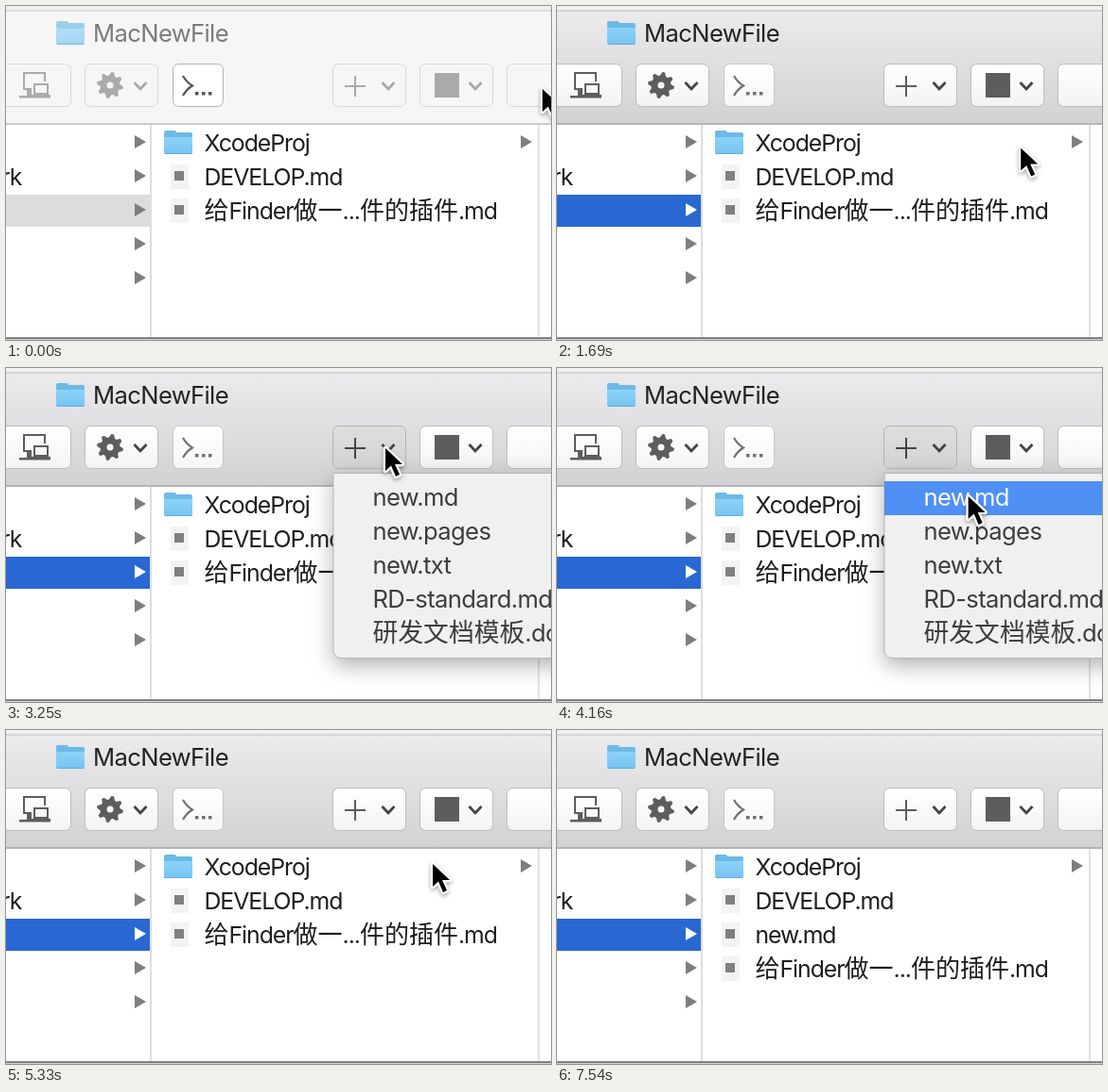
An HTML page with a canvas for the animation above (7.67 s loop, 576 by 354 pixels).

```html
<!DOCTYPE html>
<html lang="zh-CN">
<head>
<meta charset="utf-8">
<style>
html, body { margin: 0; width: 100%; height: 100%; overflow: hidden; background: #fff; }
canvas { display: block; }
</style>
</head>
<body>
<canvas id="stage" width="576" height="354"></canvas>
<script>
const c = document.getElementById('stage').getContext('2d');
const LOOP = 7670, STEP = 130, ROW = 36;

// Cursor path: time, x, y of the tip
const path = [
  [0, 565, 84], [130, 462, 178], [1300, 462, 178], [1430, 541, 188],
  [2080, 409, 84], [2340, 409, 84], [2470, 405, 82], [2600, 399, 81],
  [3250, 399, 81], [3640, 404, 104], [4420, 447, 146], [4550, 449, 138],
  [5720, 449, 138], [5850, 451, 136], [6760, 451, 136], [6890, 468, 139],
  [7280, 468, 139], [7410, 482, 150], [LOOP, 482, 150]
];
const menuItems = ['new.md', 'new.pages', 'new.txt', 'RD-standard.md', '研发文档模板.docx'];

// Font styles: Latin size, tracking, Chinese size
const LIST = [24.8, -1.03, 26], MENU = [25.6, -.63, 26.8];

function cursorAt(t) {
  const i = path.findIndex(p => p[0] > t);
  const [t0, x0, y0] = path[i - 1], [t1, x1, y1] = path[i];
  const k = (t - t0) / (t1 - t0);
  return [x0 + (x1 - x0) * k, y0 + (y1 - y0) * k];
}

function rect(x, y, w, h, color) {
  c.fillStyle = color;
  c.fillRect(x, y, w, h);
}

function poly(points, color) {
  c.beginPath();
  points.forEach(([x, y]) => c.lineTo(x, y));
  c.closePath();
  c.fillStyle = color;
  c.fill();
}

function line(points, color, width) {
  c.beginPath();
  points.forEach(([x, y]) => c.lineTo(x, y));
  c.strokeStyle = color;
  c.lineWidth = width;
  c.stroke();
}

function fade(y0, y1, from, to) {
  const g = c.createLinearGradient(0, y0, 0, y1);
  g.addColorStop(0, from);
  g.addColorStop(1, to);
  return g;
}

// Latin and Chinese runs alternate, each with its own font
function text(s, x, y, [size, tracking, hanSize], color) {
  c.fillStyle = color;
  s.split(/([^\x00-\x7f]+)/).forEach((run, i) => {
    const han = i % 2;
    c.font = han ? `${hanSize}px "Noto Sans CJK SC", "Noto Sans CJK", sans-serif`
                 : `${size}px Inter, sans-serif`;
    c.letterSpacing = (han ? 0 : tracking) + 'px';
    c.fillText(run, x, y);
    x += c.measureText(run).width;
  });
}

function folder(x, y) {
  c.beginPath();
  c.roundRect(x, y, 13, 6, 2);
  c.roundRect(x, y + 2, 30, 6, 2);
  c.fillStyle = '#6cbae6';
  c.fill();
  c.beginPath();
  c.roundRect(x, y + 7, 30, 18, 1.5);
  c.fillStyle = fade(y + 7, y + 25, '#8cd2f8', '#76c4f2');
  c.fill();
  rect(x + 1, y + 24, 28, 1, '#5fadd9');
}

function page(y) {
  rect(174, y, 19, 26, '#f3f3f3');
  rect(178, y + 7, 10, 10, '#808080');
}

function button(x, w, top, bottom, border) {
  c.beginPath();
  c.roundRect(x + .5, 61.5, w, 45, 6);
  c.fillStyle = fade(61, 107, top, bottom);
  c.fill();
  c.strokeStyle = border;
  c.lineWidth = 1;
  c.stroke();
}

function chevron(x, color) {
  line([[x - 6.5, 81], [x, 88], [x + 6.5, 81]], color, 2.8);
}

function gear(x, y, color) {
  c.beginPath();
  for (let i = 0; i < 32; i++) {
    const a = (i + .5) * Math.PI / 16, r = i % 4 < 2 ? 14 : 10.5;
    c.lineTo(x + r * Math.cos(a), y + r * Math.sin(a));
  }
  c.closePath();
  c.moveTo(x + 3.5, y);
  c.arc(x, y, 3.5, 0, 2 * Math.PI, true);
  c.fillStyle = color;
  c.fill('evenodd');
}

function devices(color, face) {
  c.strokeStyle = color;
  c.lineWidth = 2;
  c.strokeRect(19, 71, 22, 17);
  rect(22, 89, 5, 6, color);
  rect(14, 95, 14, 2.5, color);
  rect(27, 80, 20, 18, face);
  c.strokeRect(30, 83, 14, 10);
  rect(27, 94, 20, 3.5, color);
}

function toolbar(active, open) {
  rect(0, 0, 576, 5, '#f1f1f1');
  rect(0, 5, 576, 120, active ? fade(5, 125, '#ebeaec', '#d2d1d3') : '#f6f6f6');
  rect(0, 4, 576, 2, active ? '#d4d4d4' : '#dcdcdc');
  rect(0, 124, 576, 2, active ? '#b4b4b4' : '#cbcbcb');

  c.globalAlpha = active ? 1 : .65;
  folder(53, 16);
  c.globalAlpha = 1;
  text('MacNewFile', 92, 38, MENU, active ? '#222' : '#7b7b7b');

  const look = active ? ['#fff', '#f3f3f3', '#bdbdbd'] : ['#f7f7f7', '#f6f6f6', '#d8d8d8'];
  const ink = active ? '#5d5d5d' : '#aaa';
  button(-12, 80, ...look);
  button(83, 77, ...look);
  button(176, 53, '#fff', active ? '#f6f6f6' : '#fff', active ? '#c6c6c6' : '#b3b3b3');
  button(345, 77, ...(open ? ['#dedede', '#d3d3d3', '#b4b4b4'] : look));
  button(437, 77, ...look);
  button(529, 80, ...look);

  devices(ink, active ? '#fafafa' : '#f6f6f6');
  gear(110, 84, ink);
  [142, 404, 496].forEach(x => chevron(x, active ? '#444' : ink));

  const prompt = active ? '#707070' : '#555';
  c.beginPath();
  c.moveTo(187, 74);
  c.quadraticCurveTo(191, 81, 197, 84.5);
  c.quadraticCurveTo(191, 88, 187, 95);
  c.strokeStyle = prompt;
  c.lineWidth = 2.2;
  c.stroke();
  [200, 207, 214].forEach(x => rect(x, 91, 3.5, 3.5, prompt));

  const plus = open ? '#444' : ink;
  rect(358, 84, 22, 2, plus);
  rect(368, 74, 2, 22, plus);
  rect(453, 71, 26, 26, ink);
}

function arrow(x, y, color) {
  poly([[x, y - 7], [x + 12, y], [x, y + 7]], color);
}

function columns(active, hasNew) {
  rect(0, 126, 576, 228, '#fff');
  rect(0, 200, 152, 34, active ? '#2968d3' : '#dcdcdc');
  rect(152, 126, 2, 228, '#dedede');
  rect(562, 126, 2, 228, '#e2e2e2');
  for (let i = 0; i < 5; i++) arrow(136, 144 + i * ROW, active && i === 2 ? '#fff' : '#7e7e7e');
  arrow(544, 144, '#7e7e7e');
  text('rk', -5, 190, LIST, '#1e1e1e');

  const files = ['XcodeProj', 'DEVELOP.md', '给Finder做一...件的插件.md'];
  if (hasNew) files.splice(2, 0, 'new.md');
  files.forEach((name, i) => {
    if (i) page(132 + i * ROW);
    else folder(167, 132);
    text(name, 209.5, 154 + i * ROW, LIST, '#1e1e1e');
  });
}

function menu(hover, alpha) {
  c.save();
  c.globalAlpha = alpha;
  c.beginPath();
  c.roundRect(346, 111.5, 260, 196, [0, 0, 8, 8]);
  c.shadowColor = 'rgba(0,0,0,.3)';
  c.shadowBlur = 22;
  c.shadowOffsetY = 8;
  c.fillStyle = '#f0f0f0';
  c.fill();
  c.shadowColor = 'transparent';
  c.strokeStyle = '#b5b5b5';
  c.lineWidth = 1;
  c.stroke();
  menuItems.forEach((name, i) => {
    if (i === hover) rect(346, 120 + i * ROW, 230, ROW, '#4f90f5');
    text(name, 387.5, 146 + i * ROW, MENU, i === hover ? '#fff' : '#3d3d3d');
  });
  c.restore();
}

function cursor(x, y) {
  c.save();
  c.translate(x, y);
  c.lineJoin = 'round';
  c.shadowColor = 'rgba(0,0,0,.35)';
  c.shadowBlur = 4;
  c.shadowOffsetY = 2;
  const shape = [[2, 4], [2, 28], [8, 22.5], [13, 34], [17, 32], [12, 21], [20, 21]];
  line([...shape, shape[0], shape[1]], '#fff', 4.5);
  c.shadowColor = 'transparent';
  poly(shape, '#000');
  c.restore();
}

function draw(t) {
  const active = t >= 780;
  const open = t >= 2990 && t < 5330;
  const [x, y] = cursorAt(t);
  toolbar(active, open);
  columns(active, t >= 5590);
  if (t < 780 || t >= 1040) {
    rect(0, 351, 576, 2, '#808080');
    rect(0, 353, 576, 1, '#d4d4d4');
  }
  if (open) {
    const blink = t >= 4680 && t < 4810;
    menu(blink ? -1 : Math.floor((y - 120) / ROW), t < 5200 ? 1 : .5);
  }
  if (t < 910 || (t >= 1430 && t < 7540)) cursor(x, y);
}

const start = performance.now();
function tick() {
  const t = (performance.now() - start) % LOOP;
  draw(Math.floor(t / STEP) * STEP);
  requestAnimationFrame(tick);
}
tick();
</script>
</body>
</html>
```
